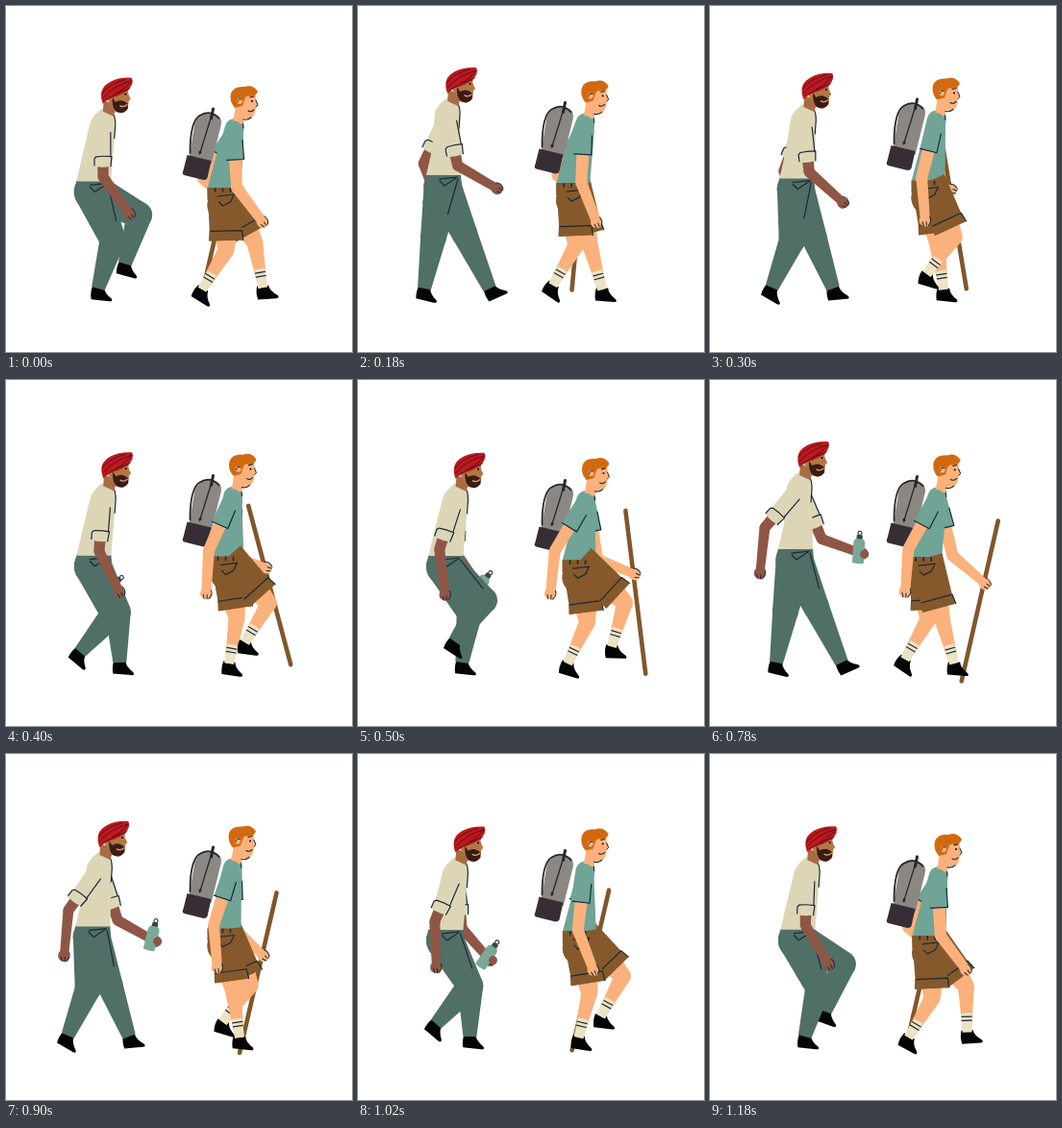
These frames come from a looping animation (360 by 360 pixels, 1200 ms). An HTML page with a canvas:

```html
<!DOCTYPE html>
<html>
<head>
<meta charset="utf-8">
<style>
html, body { margin: 0; width: 100%; height: 100%; overflow: hidden; background: #fff; }
canvas { display: block; width: 360px; height: 360px; }
</style>
</head>
<body>
<canvas id="stage" width="360" height="360"></canvas>
<script>
const ctx = document.getElementById('stage').getContext('2d');
const LOOP = 1200, HALF = LOOP / 2, STEP = 20, TAU = 2 * Math.PI, DEG = Math.PI / 180;
const INK = '#1c2935', BLACK = '#050505';
const CREAM = '#dcd6b7', PANTS = '#506f66', BROWN = '#8f5646', RED = '#bd181e';
const TEAL = '#70a496', SHORTS = '#85592b', PEACH = '#fbb17b', GINGER = '#d3690f', SOCK = '#ebe3c6';

// --- Motion -----------------------------------------------------------------

// Cyclic swell from 0 to 1 that tops out at `peak`; a higher power is sharper.
const swell = (t, peak, power = 1, period = LOOP) =>
  ((1 + Math.cos(TAU * (t - peak) / period)) / 2) ** power;

const add = ([x, y], dx, dy) => [x + dx, y + dy];
const angle = (a, b) => Math.atan2(b[1] - a[1], b[0] - a[0]);
const toward = (a, b, d) => add(a, d * Math.cos(angle(a, b)), d * Math.sin(angle(a, b)));
const side = (a, b, p, d) => add(p, -d * Math.sin(angle(a, b)), d * Math.cos(angle(a, b)));
// Degrees are measured from straight down, forward positive.
const hang = (p, deg, length) => add(p, length * Math.sin(deg * DEG), length * Math.cos(deg * DEG));

// Ankle position and foot tilt: slide back on the ground, push off, swing forward.
function footAt(t, strike, walk) {
  const s = (t - strike + 2 * LOOP) % LOOP, a = TAU * s / LOOP;
  const reach = Math.cos(a) + .22 * Math.sin(a) - .21 * Math.sin(2 * a);
  const air = Math.max(0, (s - 700) / (LOOP - 700));
  return [
    walk.x + walk.stride * reach,
    walk.ground - walk.lift * Math.sin(Math.PI * air ** 1.4),
    6 + walk.push * swell(s, walk.pushTime, 4) - walk.heel * swell(s, 0, 10)
  ];
}

function kneeFor(hip, foot, thigh, shin) {
  const d = Math.min(Math.hypot(foot[0] - hip[0], foot[1] - hip[1]), thigh + shin);
  const along = (thigh ** 2 - shin ** 2 + d * d) / (2 * d);
  return side(hip, foot, toward(hip, foot, along), -Math.sqrt(Math.max(0, thigh ** 2 - along ** 2)));
}

function armFrom(shoulder, cuffLength, [upper, upperLength], [fore, foreLength]) {
  const elbow = hang(shoulder, upper, upperLength);
  return { shoulder, elbow, cuff: hang(shoulder, upper, cuffLength), palm: hang(elbow, fore, foreLength) };
}

// --- Drawing helpers --------------------------------------------------------

const fill = (d, color) => { ctx.fillStyle = color; ctx.fill(new Path2D(d)); };
const stroke = (d, width = 1.2, color = INK) => {
  ctx.strokeStyle = color; ctx.lineWidth = width; ctx.stroke(new Path2D(d));
};
const pathOf = points => 'M' + points.map(p => p[0] + ' ' + p[1]).join('L');
const poly = (points, color) => fill(pathOf(points) + 'Z', color);
const line = (points, width, color) => stroke(pathOf(points), width, color);

function disc([x, y], r, color) {
  ctx.fillStyle = color;
  ctx.beginPath();
  ctx.arc(x, y, r, 0, TAU);
  ctx.fill();
}

function place([x, y], radians, draw) {
  ctx.save();
  ctx.translate(x, y);
  ctx.rotate(radians);
  draw();
  ctx.restore();
}

// Tapered limb with rounded inner joints.
function limb(points, widths, color) {
  for (let i = 1; i < points.length; i++) {
    const a = points[i - 1], b = points[i], wa = widths[i - 1] / 2, wb = widths[i] / 2;
    poly([side(a, b, a, wa), side(a, b, b, wb), side(a, b, b, -wb), side(a, b, a, -wa)], color);
    if (i < points.length - 1) disc(b, wb, color);
  }
}

function shoe(foot) {
  place(foot, foot[2] * DEG, () =>
    fill('M-6-2L6-2Q7 4 15 9Q17 12 13 12L-6 12Q-8 5-6-2Z', BLACK));
}

function hand(elbow, palm, color) {
  place(palm, angle(elbow, palm), () => {
    fill('M-7-4L0-5Q6-6 8-2Q8 4 4 6Q-1 7-3 4L-7 4Z', color);
    stroke('M-2-5Q3-7 7-3M3-1L7-1M3 3L7 2', 1);
  });
}

function bareArm({ cuff, elbow, palm }, color, widths) {
  limb([cuff, elbow, palm], widths, color);
  hand(elbow, palm, color);
}

// --- Walker with the turban -------------------------------------------------

const hikerWalk = { x: 103, stride: 34, ground: 294, lift: 26, push: 34, pushTime: 830, heel: 30 };

function rolledSleeve({ shoulder, cuff }) {
  disc(shoulder, 9, CREAM);
  limb([shoulder, cuff], [18, 16], CREAM);
  line([side(shoulder, cuff, toward(shoulder, cuff, 9), -8), side(shoulder, cuff, cuff, -8)]);
  place(cuff, angle(shoulder, cuff), () => {
    fill('M-5-9L5-8Q7 0 5 9L-4 9Z', CREAM);
    stroke('M5-8L-5-9Q-6 0-5 7L-3 9L4 9');
  });
}

function trouserLeg(hip, foot) {
  const top = add(hip, -1, 8), knee = kneeFor(top, foot, 54, 53);
  shoe(foot);
  disc(top, 19.5, PANTS);
  limb([top, knee, foot], [39, 27, 14], PANTS);
  return knee;
}

function hikerHead() {
  fill('M102 98L116 104L112 115L101 110Z', '#a96b43');
  fill('M106 98L126 85L128 93L130 97L128 99L127 107Q123 114 114 110Z', '#b27744');
  fill('M111 95L114 100Q121 96 127 102L127 107Q122 114 115 110Q110 106 111 95Z', '#3b1c15');
  stroke('M119 104Q123 106 126 103', 1.4, '#d99a83');
  stroke('M122 87L127 88', 1.2, BLACK);
  disc([124.5, 92], 1, BLACK);
  fill('M101 102Q95 86 109 79Q119 74 131 75Q134 81 127 88Q118 94 112 95Q106 97 101 102Z', RED);
  stroke('M101 96Q112 83 131 78M100 91Q109 80 124 77M104 98Q117 90 129 86M114 92Q125 86 130 79', 1, '#5d1018');
}

function bottle() {
  fill('M-6-8Q-6-11-2-13L2-13Q6-11 6-8L6 13Q0 15-6 13Z', '#7aa996');
  fill('M-3-16L3-16L3-12L-3-12Z', '#39434a');
  stroke('M-2-18A2 2 0 1 1 2-18A2 2 0 1 1-2-18', 1.2, '#39434a');
}

function drawHiker(t) {
  const rise = swell(t, 190, 2, HALF), raised = swell(t, 780, 2);
  const head = [.5 - 8.5 * rise, .8 - 11.8 * rise];
  const hip = [91.5 - 2.5 * rise, 186 - 7 * rise];
  const at = (x, y) => add(head, x, y);
  const near = armFrom(at(101, 123), 39, [52 * swell(t, 180) - 41, 55], [66 * swell(t, 180, 2) - 6, 46]);
  const far = armFrom(at(102, 124), 38, [50 * swell(t, 780) - 27, 57], [20 + 50 * raised, 43]);

  bareArm(far, BROWN, [12, 11, 9]);
  place(add(far.palm, -2, -3), (58 - 54 * raised) * DEG, bottle);
  disc(add(far.palm, 4, 1), 4.5, BROWN);
  rolledSleeve(far);

  trouserLeg(hip, footAt(t, 180, hikerWalk));
  const nearKnee = trouserLeg(hip, footAt(t, 780, hikerWalk));
  poly([add(hip, -18, -4), add(hip, 18, -4), add(hip, 19, 9), add(hip, -20, 9)], PANTS);

  const [lx, ly] = add(hip, -18, -3), [rx, ry] = add(hip, 18, -3);
  const [nx, ny] = at(100, 107), [sx, sy] = at(88, 121), [cx, cy] = at(112, 113), [fx, fy] = at(114, 124);
  fill(`M${nx} ${ny}Q${sx + 3} ${sy - 7} ${sx} ${sy}L${lx + 6} ${ly - 26}L${lx} ${ly}L${rx} ${ry}
    L${fx} ${fy}Q${fx} ${fy - 8} ${cx} ${cy}Z`, CREAM);
  stroke(`M${cx} ${cy}Q${fx} ${fy - 8} ${fx} ${fy}L${fx - 1} ${fy + 14}`);

  // Front seam and pocket
  const seam = add(hip, 15, 1);
  line([seam, toward(seam, add(nearKnee, 8, 0), 38)]);
  line([add(hip, -4, 3), add(hip, 1, 8), add(hip, 13, 0)]);
  line([add(hip, -4, 1), add(hip, 14, -1)]);

  place(head, 0, hikerHead);
  bareArm(near, BROWN, [12, 11, 9]);
  rolledSleeve(near);
}

// --- Walker with the pack ---------------------------------------------------

const scoutWalk = { x: 235, stride: 32, ground: 295, lift: 22, push: 34, pushTime: 690, heel: 10 };

function bareLeg(hip, foot) {
  const knee = kneeFor(hip, foot, 64, 48);
  const hem = toward(hip, knee, 54), fold = toward(hem, hip, 10), sock = toward(foot, knee, 20);
  shoe(foot);
  limb([toward(hip, knee, 46), knee, foot], [24, 17, 9], PEACH);
  limb([sock, foot], [10.5, 10], SOCK);
  for (const d of [12, 16]) {
    const p = toward(foot, knee, d);
    line([side(foot, knee, p, -5), side(foot, knee, p, 5)], 1.2);
  }
  disc(add(hip, 0, 17), 18, SHORTS);
  limb([hip, hem], [36, 33], SHORTS);
  limb([fold, hem], [34, 36], SHORTS);
  line([side(hip, hem, fold, 16), side(hip, hem, fold, -17), side(hip, hem, hem, -18)]);
}

function scoutHead() {
  fill('M240 98L260 90L260 98L262 103L260 105Q260 114 254 117L248 117L246 123L236 121Z', PEACH);
  fill('M238 106Q232 99 234 91Q237 83 248 84Q257 81 262 89Q260 94 254 94Q249 93 248 98L246 104Z', GINGER);
  disc([243, 99], 3, PEACH);
  stroke('M241 100Q241 96 245 97M260 98L262 103L260 105', 1);
  stroke('M254 95L258 94M252 109Q255 111 258 108', 1.1);
  disc([256, 99], 1, BLACK);
  stroke('M247 118Q252 119 255 116');
}

function pack() {
  fill('M191 158L197 122Q202 110 213 111Q227 113 224 125L214 165Z', '#8b8884');
  fill('M189 155L214 161L210 179Q209 181 206 181L186 176Q183 175 185 171Z', '#372e35');
  stroke('M192 153Q192 120 202 114Q213 107 222 117', 1.8, '#29262b');
  stroke('M216 107L214 117', 3, '#29262b');
  stroke('M215 112L202 154', 1.3, '#29262b');
  disc([202.5, 152], 1.6, '#29262b');
}

function shortSleeve({ shoulder, cuff }) {
  disc(shoulder, 8.5, TEAL);
  limb([shoulder, cuff], [17, 18], TEAL);
  line([side(shoulder, cuff, toward(shoulder, cuff, 12), -8.5), side(shoulder, cuff, cuff, -9),
    side(shoulder, cuff, cuff, 9)]);
}

function drawScout(t) {
  const rise = swell(t, 300, 1, HALF);
  const head = [-2 * rise, -8.5 * rise];
  const hip = [227.5 - 3.5 * Math.sin(TAU * t / HALF), 190 - 7.5 * rise];
  const at = (x, y) => add(head, x, y);
  const near = armFrom(at(237, 128), 32, [38 * swell(t, 20) - 35, 61], [43 * swell(t, 0, 2) - 6, 43]);
  const far = armFrom(at(239, 129), 31, [54 * swell(t, 660) - 35, 61],
    [47 + 25 * swell(t, 400, 2), 28 + 16 * swell(t, 700)]);

  limb([far.cuff, far.elbow, far.palm], [13, 12, 9], PEACH);
  place(far.palm, (13 - 28 * swell(t, 390, 4)) * DEG, () => line([[0, -66], [0, 105]], 4.6, '#80572a'));
  hand(far.elbow, far.palm, PEACH);
  shortSleeve(far);
  place([-.5, -10 * rise], 0, pack);

  bareLeg(hip, footAt(t, 10, scoutWalk));
  const [lx, ly] = add(hip, -18, 0), [rx, ry] = add(hip, 17, 0);
  const [nx, ny] = at(237, 117), [sx, sy] = at(228, 125), [fx, fy] = at(247, 127);
  fill(`M${nx} ${ny}Q${sx + 2} ${sy - 7} ${sx} ${sy}L${lx + 9} ${ly - 34}L${lx} ${ly}
    L${rx} ${ry}L${fx} ${fy + 12}L${fx} ${fy}Q${fx} ${fy - 8} ${fx - 4} ${fy - 10}Z`, TEAL);
  stroke(`M${fx - 3} ${fy - 9}Q${fx} ${fy - 6} ${fx} ${fy}`);
  bareLeg(hip, footAt(t, 610, scoutWalk));
  poly([add(hip, -18, -1), add(hip, 17, -1), add(hip, 18, 12), add(hip, -18, 12)], SHORTS);

  // Belt loops and pocket
  for (const x of [-10, -2, 6]) line([add(hip, x, 0), add(hip, x, 3)], 1.6);
  line([add(hip, -7, 8), add(hip, 10, 6), add(hip, 6, 14), add(hip, -2, 18), add(hip, -6, 14)]);

  place(head, 0, scoutHead);
  bareArm(near, PEACH, [13, 12, 10]);
  shortSleeve(near);
}

ctx.lineCap = ctx.lineJoin = 'round';
function frame(now) {
  const t = Math.floor(now % LOOP / STEP) * STEP;
  ctx.fillStyle = '#fff';
  ctx.fillRect(0, 0, 360, 360);
  drawHiker(t);
  drawScout(t);
  requestAnimationFrame(frame);
}
frame(performance.now());
</script>
</body>
</html>
```
